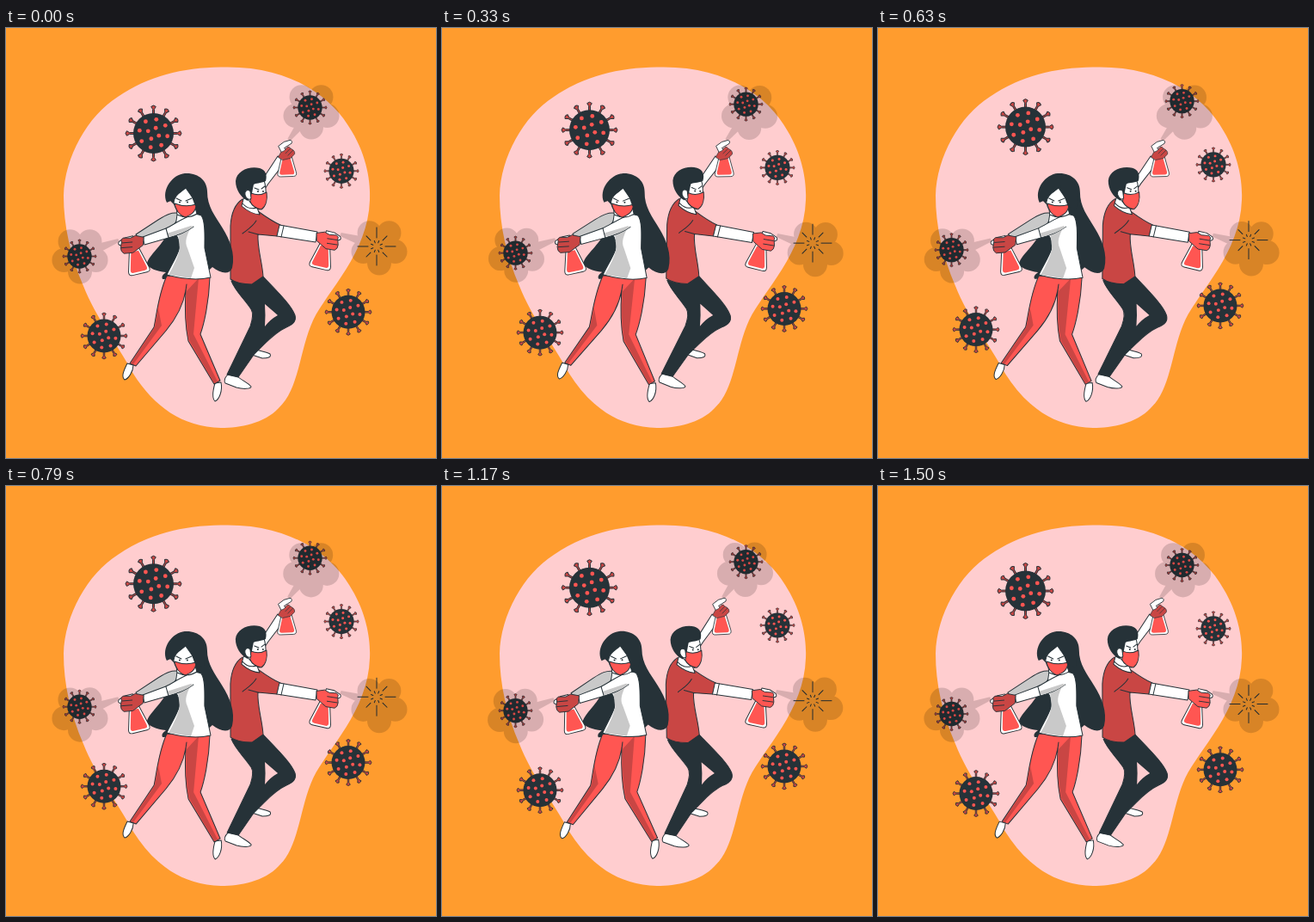
Write an HTML page that moves like this. It is 500 px wide and 500 px high and loops after 1.54 s.

```html
<!DOCTYPE html>
<html lang="en">
<head>
<meta charset="utf-8">
<title>Spraying viruses</title>
<style>
html, body { margin: 0; width: 100%; height: 100%; overflow: hidden; background: #ff9c2e; }
svg { display: block; width: 100vw; height: 100vh; }
.o { stroke: #263238; stroke-width: 1; stroke-linejoin: round; stroke-linecap: round; }
.line { fill: none; }
.w { fill: #fff; } .r { fill: #ff5652; } .d { fill: #263238; }
.g { fill: #c9c9c9; } .s { fill: #c94644; }
.cloud { fill: #000; opacity: .15; }
</style>
</head>
<body>
<svg viewBox="0 0 500 500">
  <rect width="500" height="500" fill="#ff9c2e"/>
  <path fill="#ffcdcf" d="M250 45.5C330 43 380 80 402 120C420 150 424 180 423 200C421 262 374 305 357 340C341 375 341 420 317 442C300 460 272 465 250 465C205 464 172 440 148 402C128 365 105 338 90 300C75 265 67 230 67 195C68 150 95 102 130 80C165 56 205 46 250 45.5Z"/>
  <g id="floaters"></g>
  <g id="man"></g>
  <g id="woman"></g>
</svg>
<script>
const LOOP = 1540, RISE = 9, SWAY = 0.85, TAU = 2 * Math.PI;
const $ = id => document.getElementById(id);
const repeat = (n, f) => Array.from({ length: n }, (_, i) => f(i)).join('');
const path = (cls, d) => `<path class="${cls}" d="${d}"/>`;
const circle = (x, y, r, cls = '') => `<circle class="${cls}" cx="${x}" cy="${y}" r="${r}"/>`;
const place = (x, y, rot, sx, sy, body) =>
  `<g transform="translate(${x} ${y}) rotate(${rot}) scale(${sx} ${sy})">${body}</g>`;
const turn = (deg, body) => place(0, 0, deg, 1, 1, body);

// n circles of radius r spread evenly on a ring
const ring = (n, x, y, radius, r, phase, cls) => repeat(n, i => {
  const a = phase + i * TAU / n;
  return circle(x + radius * Math.cos(a), y + radius * Math.sin(a), r, cls);
});

function virus(x, y, r) {
  const spike = path('s o', 'M-1 -22L-.9 -28L-2.8 -31Q0 -34 2.8 -31L.9 -28L1 -22Z');
  const k = r / 23.5;
  return place(x, y, 0, k, k,
    repeat(12, i => turn(i * 30, spike)) +
    circle(0, 0, 23.5, 'd') +
    ring(4, 0, 0, 6.8, 2.4, 0.4, 'r') +
    ring(8, 0, 0, 16.5, 2.4, 0.2, 'r'));
}

function burst(x, y) {
  const ray = (deg, a, b) => turn(deg, path('o line', `M${a} 0H${b}`));
  return place(x, y, 0, 1, 1, repeat(8, i =>
    ray(i * 45, 10, i % 2 ? 17 : 22) + ray(i * 45 + 22.5, 4.5, 7)));
}

// puff of five lobes around (x, y), fed by a widening jet from the nozzle
function cloud(x, y, nx, ny) {
  const a = Math.atan2(y - ny, x - nx) * 360 / TAU;
  const len = Math.hypot(x - nx, y - ny);
  return '<g class="cloud">' + ring(5, x, y, 19.5, 14, TAU / 4, '') + circle(x, y, 19) +
    place(nx, ny, a, 1, 1, `<path d="M0 -2L${len} -8V8L0 2Z"/>`) + '</g>';
}

// origin at the neck, nozzle to the left; side -1 mirrors it
function bottle(x, y, rot, side, k, headRot = 0) {
  const body = 'M-6 0H6L13 26Q14 31 9 31H-9Q-14 31 -13 26Z';
  return place(x, y, rot, side * k, k,
    turn(headRot, path('w o', 'M-5 0L-3 -9L-15 -8Q-19 -10 -16 -13L-8 -16H2L5 0Z')) +
    path('w o', body) + place(0, 3, 0, .78, .82, path('r', body)));
}

// origin at the cuff, fingers to the left
function fist(x, y, rot, side, k, cls) {
  return place(x, y, rot, side * k, k,
    path(cls + ' o', 'M0 -5L-10 -7L-16 -4L-25 -4Q-29 -2 -27 1L-28 8Q-28 13 -24 15L-13 14L-1 5Z') +
    path('o line', 'M-26 2L-14 1M-27 8L-14 7'));
}

const eyes = (xa, xb, y) => circle(xa, y, 1, 'd') + circle(xb, y, 1, 'd');

function man() {
  return cloud(355, 96, 329, 130) + cloud(434, 254, 389, 240) +
    // raised arm
    path('w o', 'M297 178L316 149L325 155L305 181L299 190Z') +
    bottle(326, 147, -2, -1, .83, 35) +
    fist(319, 152, -50, -1, .62, 's') +
    // shoes and trousers
    path('w o', 'M289 373C295 376 302 376 307 379C309 383 304 384 298 384L286 380Z') +
    path('w o', 'M258 403L269 405C273 409 282 413 285 417C285 420 275 420 268 418L255 413C253 410 255 406 258 403Z') +
    path('d o', 'M262 294L299 289C312 303 332 322 336 334C338 341 334 345 326 348C315 353 306 362 300 368L288 380L270 406L257 403L284 347C287 338 288 332 285 327C277 315 266 305 262 294Z') +
    `<path fill="#ffcdcf" d="M301 321L316 334Q307 339 301 347Q302 334 301 321Z"/>` +
    // shirt
    path('s o', 'M275 199C267 204 262 214 261 230L261 292C268 297 278 298 286 298L299 289C298 272 292 256 293 240L315 242L319 229C308 224 300 218 293 213Z') +
    path('o line', 'M275 239C280 235 287 231 291 224M293 240L282 237') +
    // stretched arm
    path('w o', 'M318 229L362 237L360 249L315 242Z') +
    path('o line', 'M323 230L320 243') +
    bottle(371, 251, 13, -1, .95) +
    fist(361, 243, 4, -1, .92, 'r') +
    // head
    path('w o', 'M276 199L274 207Q284 216 295 217L292 209L283 192Z') +
    path('o line', 'M275 204Q282 212 291 209') +
    path('w o', 'M285 179L300 177C303 186 304 206 295 211C289 210 285 203 281 199Z') +
    path('r o', 'M285 192Q294 196 303 191C304 198 303 207 297 211Q287 209 284 202Z') +
    path('d', 'M281 201C273 197 267 188 267 178C268 166 283 160 295 163C302 165 304 171 302 178C296 181 290 180 288 182L286 192Z') +
    path('w o', 'M284 190C281 187 277 189 278 194C279 198 283 201 285 198Z') +
    path('o line', 'M289 186L294 188M297 187L301 184') + eyes(293, 299, 190);
}

function woman() {
  return cloud(86, 264, 131, 247) +
    // hair behind
    path('d', 'M190 200L208 169C224 168 234 178 234 190C234 208 243 218 252 233C260 246 267 262 263 279C260 287 250 286 240 278L226 291L182 292C180 288 184 286 186 284C175 283 166 279 164 275C164 266 180 255 187 240L205 215Z') +
    // far arm
    path('g o', 'M203 216C193 213 185 218 177 223L151 240L157 249L189 240Z') +
    // shoes and trousers
    path('w o', 'M141 390L148 392C148 400 142 408 138 409C134 406 136 400 141 390Z') +
    path('w o', 'M243 413L250 412C252 422 248 432 243 434C239 430 241 420 243 413Z') +
    path('r o', 'M187 288L237 290C236 320 230 345 226 356L249 410L242 414L212 364C208 345 208 322 209 305C206 323 196 340 186 352L151 393L144 390L172 348C175 335 177 310 187 288Z') +
    path('s', 'M177 325L181 346L148 391L145 390L173 348ZM210 306L224 291L218 356L246 411L242 413L213 363Q208 340 210 306Z') +
    path('o line', 'M209 305L210 298') +
    // top
    path('w o', 'M199 217C207 218 219 214 227 218C232 225 231 243 231 256L238 290C221 294 202 291 187 287C191 278 198 267 201 258C203 250 200 243 196 238Z') +
    path('g', 'M200 238L214 233C211 241 207 248 211 256L219 279L215 291L189 287Q199 270 202 257Z') +
    // near arm
    path('w o', 'M212 219C201 224 194 229 186 233L159 243L161 252L189 244Q207 239 218 231') +
    path('g', 'M189 243L187 239L215 230L218 231Q207 239 189 243Z') +
    path('o line', 'M186 233L189 244') +
    bottle(149, 257, -13, 1, .95) +
    fist(160, 248, 0, 1, .95, 's') +
    // head
    path('w o', 'M198 208L219 205L222 216Q211 223 199 217Z') +
    path('w o', 'M209 186C202 192 196 194 195 203Q197 214 208 219Q219 214 221 203Z') +
    path('r o', 'M196 204Q209 209 221 205Q221 216 208 220Q198 216 196 204Z') +
    path('d', 'M211 183C204 192 196 194 194 200L187 203C180 188 194 170 208 169C222 171 231 182 232 194L230 211L220 207Z') +
    path('o line', 'M198 198L204 201M209 201L216 198') + eyes(202, 211, 202.5);
}

$('floaters').innerHTML =
  virus(171.5, 122.5, 23.5) + virus(353.5, 92.5, 14.2) + virus(390, 166.3, 14.6) +
  virus(85.5, 265.5, 14.2) + virus(114, 358, 19.5) + virus(398, 330.3, 19.5) +
  burst(431, 254);
$('man').innerHTML = man();
$('woman').innerHTML = woman();

function draw(ms) {
  const p = (ms % LOOP) / LOOP;
  const lift = RISE * (1 - Math.abs(1 - 2 * p));
  const tilt = SWAY * Math.sin(TAU * p);
  $('floaters').setAttribute('transform', `translate(0 ${-lift})`);
  $('woman').setAttribute('transform', `rotate(${tilt} 199 301)`);
  $('man').setAttribute('transform', `rotate(${tilt} 321 274)`);
}

const start = performance.now();
function tick() {
  draw(performance.now() - start);
  requestAnimationFrame(tick);
}
tick();
</script>
</body>
</html>
```
